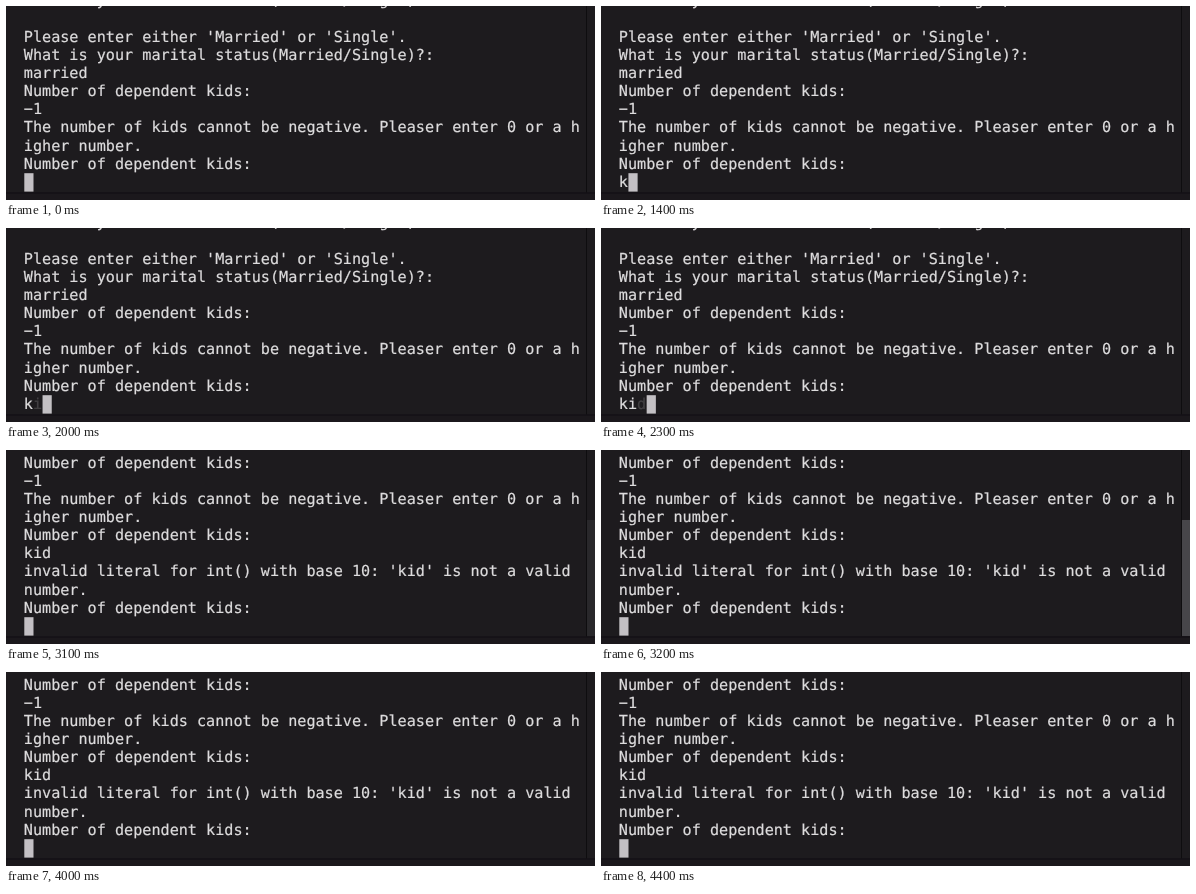
Recreate the animation shown at these times as an HTML page. Size 589x194 px, loop 8000 ms.

```html
<!DOCTYPE html>
<html lang="en">
<head>
<meta charset="utf-8">
<title>Terminal session</title>
<style>
  html, body { margin: 0; width: 100%; height: 100%; overflow: hidden; background: #1d1b1e; }
  svg { display: block; width: 589px; height: 194px; }
  text {
    font: 15.15px "DejaVu Sans Mono", monospace;
    fill: #dddcdd;
    stroke: #dddcdd;
    stroke-width: .22px;
    white-space: pre;
    text-rendering: geometricPrecision;
  }
</style>
</head>
<body>
<svg viewBox="0 0 589 194">
  <rect width="589" height="194" fill="#1d1b1e"/>
  <g id="screen"></g>
  <text x="17.8" y="180.9"><tspan id="typed"></tspan><tspan id="fresh" opacity=".42" fill-opacity=".42" stroke-opacity=".42"></tspan></text>
  <rect id="cursor" y="167.2" width="9.2" height="18.4" fill="#c3c0c4"/>
  <rect x="580" width="1" height="187" fill="#0e0d0f"/>
  <rect id="thumb" x="581" y="70" width="8" height="116" fill="#47464a"/>
  <rect y="186.5" width="589" height="7.5" fill="#1b181c"/>
  <rect y="186.5" width="589" height="1" fill="#110c13"/>
</svg>
<script>
const LOOP = 8000, LEFT = 17.8, BASELINE = 180.9, PITCH = 18.15, CELL = 9.12;
const VISIBLE_ROWS = 10;

const before = [
  "What is your marital status(Married/Single)?:",
  "",
  "Please enter either 'Married' or 'Single'.",
  "What is your marital status(Married/Single)?:",
  "married",
  "Number of dependent kids:",
  "−1",
  "The number of kids cannot be negative. Pleaser enter 0 or a h",
  "igher number.",
  "Number of dependent kids:"
];
const after = [
  ...before,
  "kid",
  "invalid literal for int() with base 10: 'kid' is not a valid ",
  "number.",
  "Number of dependent kids:"
];

// Each step: start time, settled input, fading-in letter, scrollbar opacity
const steps = [
  { at: 0, typed: "", fresh: "", thumb: 0 },
  { at: 1400, typed: "k", fresh: "", thumb: 0 },
  { at: 2000, typed: "k", fresh: "i", thumb: 0 },
  { at: 2100, typed: "ki", fresh: "", thumb: 0 },
  { at: 2300, typed: "ki", fresh: "d", thumb: 0 },
  { at: 2400, typed: "kid", fresh: "", thumb: 0 },
  { at: 3100, typed: "", fresh: "", thumb: 0.3, submitted: true },
  { at: 3200, typed: "", fresh: "", thumb: 1, submitted: true },
  { at: 4000, typed: "", fresh: "", thumb: 0, submitted: true }
];

const byId = id => document.getElementById(id);
const [screen, typed, fresh, cursor, thumb] =
  ["screen", "typed", "fresh", "cursor", "thumb"].map(byId);

function showLines(lines) {
  screen.replaceChildren(...lines.slice(-VISIBLE_ROWS).map((line, row) => {
    const text = document.createElementNS("http://www.w3.org/2000/svg", "text");
    text.setAttribute("x", LEFT);
    text.setAttribute("y", BASELINE - (VISIBLE_ROWS - row) * PITCH);
    text.textContent = line;
    return text;
  }));
}

let current;
function render(now) {
  const time = now % LOOP;
  const step = steps.findLast(s => s.at <= time);
  if (step !== current) {
    current = step;
    showLines(step.submitted ? after : before);
    typed.textContent = step.typed;
    fresh.textContent = step.fresh;
    const length = step.typed.length + step.fresh.length;
    cursor.setAttribute("x", LEFT + 0.5 + length * CELL);
    thumb.setAttribute("opacity", step.thumb);
  }
  requestAnimationFrame(render);
}
render(0);
</script>
</body>
</html>
```
